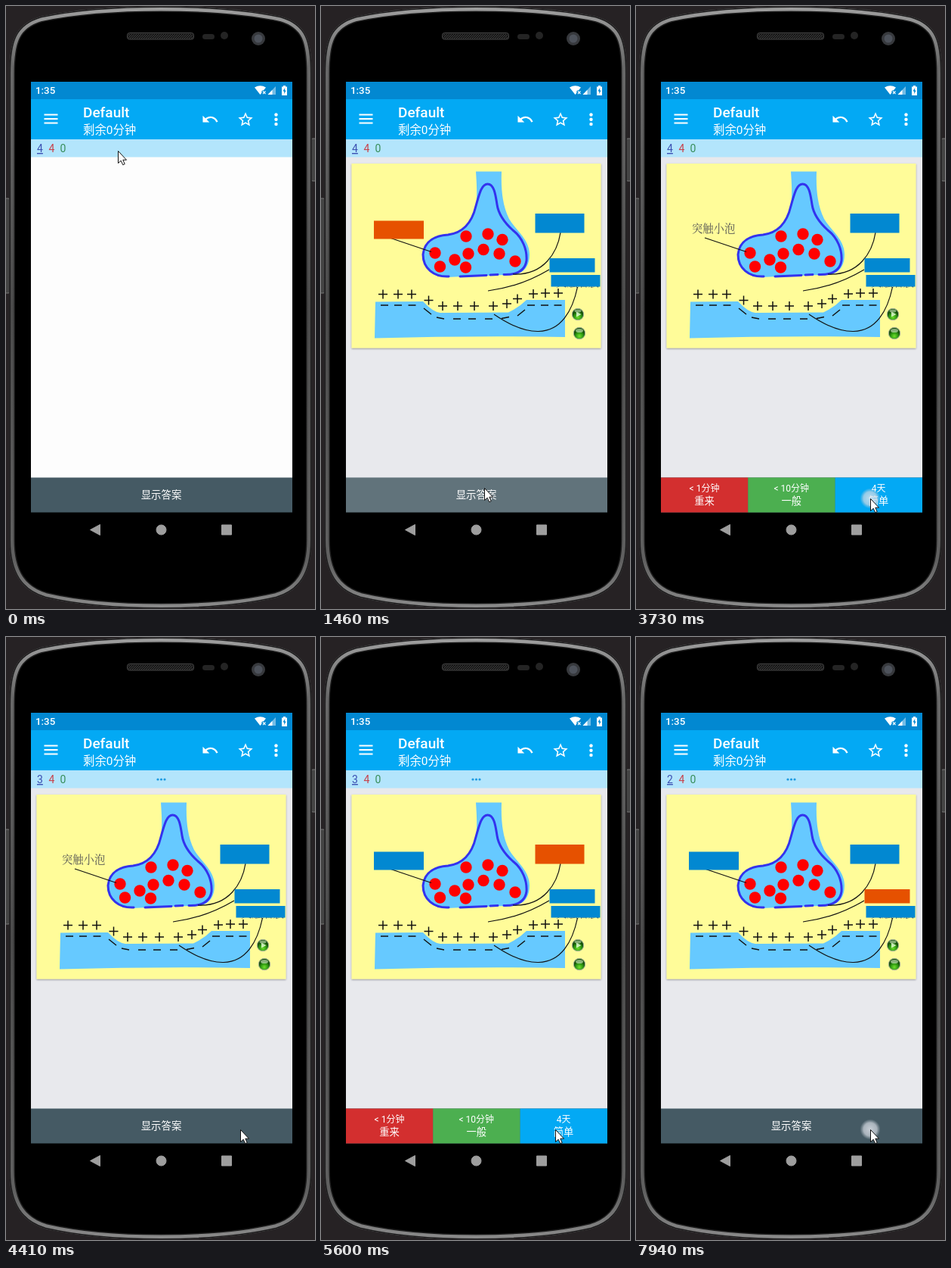
Recreate the animation shown at these times as an HTML page. Size 409x796 px, loop 8000 ms.

```html
<!DOCTYPE html>
<html lang="zh">
<head>
<meta charset="utf-8">
<style>
html, body { margin: 0; width: 100%; height: 100%; overflow: hidden; background: #262224; }
svg { display: block; width: 409px; height: 796px; }
text { font-family: Roboto, "Noto Sans CJK SC", "Noto Sans CJK", sans-serif; fill: #fff; }
.mid { text-anchor: middle; }
.label { font: 300 14.3px "Noto Serif CJK SC", "Noto Sans CJK SC", "Noto Sans CJK", serif; fill: #555; }
.thin { fill: none; stroke: #111; stroke-width: 1.2; }
.membrane { fill: none; stroke: #3333ee; stroke-width: 3; stroke-linecap: round; }
</style>
</head>
<body>
<svg viewBox="0 0 409 796">
  <defs>
    <path id="shell" d="M4.500 90C4.500 46 12 24 46 14C95 4 150 .5 205 .5C260 .5 315 4 364 14C398 24 404.500 46 404.500 90V705C404.500 750 388 772 358 781C315 791 260 795.500 205 795.500C150 795.500 95 791 52 781C22 772 4.500 750 4.500 705Z"/>
    <clipPath id="inside"><use href="#shell"/></clipPath>
    <clipPath id="easyClip"><rect x="263.500" y="622" width="115.500" height="47"/></clipPath>
    <linearGradient id="rim" x2="0" y2="1">
      <stop offset="0" stop-color="#a0a0a0"/>
      <stop offset=".1" stop-color="#686868"/>
      <stop offset=".5" stop-color="#4a4a4a"/>
      <stop offset=".92" stop-color="#606060"/>
      <stop offset="1" stop-color="#8c8c8c"/>
    </linearGradient>
    <pattern id="mesh" width="3" height="3" patternUnits="userSpaceOnUse">
      <path d="M0 3L3 0" stroke="#4a4a4a" stroke-width=".8"/>
    </pattern>
    <radialGradient id="touch">
      <stop offset="0" stop-color="#e8ebf2" stop-opacity=".8"/>
      <stop offset=".65" stop-color="#d5dae2" stop-opacity=".7"/>
      <stop offset="1" stop-color="#c0c8d0" stop-opacity="0"/>
    </radialGradient>
    <radialGradient id="bead" cx=".5" cy=".75">
      <stop offset="0" stop-color="#6fe02c"/>
      <stop offset=".6" stop-color="#2f9a12"/>
      <stop offset="1" stop-color="#155008"/>
    </radialGradient>
    <filter id="shade" x="-5%" y="-5%" width="110%" height="112%">
      <feDropShadow dx="0" dy="1" stdDeviation="1.2" flood-opacity=".4"/>
    </filter>
  </defs>

  <!-- phone -->
  <rect width="409" height="796" fill="#262224"/>
  <rect x="-3" y="254" width="8" height="125" rx="2" fill="#444" stroke="#777"/>
  <rect x="404" y="175" width="9" height="56" rx="2" fill="#444" stroke="#777"/>
  <g clip-path="url(#inside)" fill="none">
    <use href="#shell" fill="#000" stroke="#1d1d1d" stroke-width="15"/>
    <use href="#shell" stroke="url(#rim)" stroke-width="12"/>
    <use href="#shell" stroke="#1c1b1c" stroke-width="3"/>
  </g>
  <rect x="160.500" y="35.500" width="88" height="8.500" rx="3" fill="#161616" stroke="#484848"/>
  <rect x="162" y="37" width="85" height="6" fill="url(#mesh)"/>
  <rect x="260" y="37" width="16" height="7" rx="3.500" fill="#242424"/>
  <circle cx="289" cy="39" r="5" fill="#242424"/>
  <circle cx="334" cy="43" r="9" fill="#37393d"/>
  <circle cx="334" cy="43" r="5.500" fill="#4d525b"/>

  <!-- bars -->
  <rect id="page" x="33" y="199" width="346" height="424"/>
  <rect x="33" y="100" width="346" height="23" fill="#0288d1"/>
  <rect x="33" y="123" width="346" height="53" fill="#03a9f4"/>
  <rect x="33" y="176" width="346" height="23.500" fill="#b3e5fc"/>
  <text x="39" y="116.300" font-size="13.300" font-weight="500">1:35</text>
  <g fill="#fff">
    <path d="M329 107.500Q336.500 103 344 107.500L336.500 117Z"/>
    <path d="M339 112l4 4m0-4l-4 4" stroke="#0288d1" stroke-width="3"/>
    <path d="M340 112.500l3.500 3.500m0-3.500l-3.500 3.500" stroke="#fff" stroke-width="1.100"/>
    <path d="M357 106V117H346.500Z" opacity=".45"/>
    <path d="M352.500 110.700V117H346.500Z"/>
    <path d="M365 106.500h2v-1.500h3v1.500h2V118h-7Z"/>
    <path d="M369.200 108l-2.700 4.500h1.700v3.500l2.500-4.500h-1.500Z" fill="#0288d1"/>
    <path d="M50.500 142.500h18v2h-18zm0 5.500h18v2h-18zm0 5.500h18v2h-18z"/>
    <path transform="translate(258.500 137.800) scale(.98)" d="M12.500 8c-2.650 0-5.050.99-6.900 2.600L2 7v9h9l-3.620-3.620c1.390-1.160 3.160-1.880 5.120-1.880 3.540 0 6.550 2.310 7.600 5.500l2.370-.78C21.080 11.030 17.150 8 12.500 8z"/>
    <path transform="translate(305.400 138.200) scale(.97)" d="M22 9.240l-7.190-.62L12 2 9.190 8.630 2 9.240l5.460 4.730L5.820 21 12 17.270 18.180 21l-1.630-7.030zM12 15.400l-3.760 2.270 1-4.280-3.320-2.880 4.380-.38L12 6.100l1.710 4.040 4.380.38-3.320 2.880 1 4.280z"/>
    <circle cx="357.500" cy="143.500" r="2.200"/><circle cx="357.500" cy="149.700" r="2.200"/><circle cx="357.500" cy="155.900" r="2.200"/>
  </g>
  <text x="102" y="147" font-size="19" font-weight="500">Default</text>
  <text x="102" y="168.500" font-size="15.400">剩余0分钟</text>
  <g font-size="14">
    <text id="left" x="41" y="193" style="fill:#3b50b2;text-decoration:underline">4</text>
    <text x="56.500" y="193" style="fill:#c8414a">4</text>
    <text x="71.500" y="193" style="fill:#388e5a">0</text>
  </g>
  <g id="dots" fill="#1e9be2">
    <circle cx="201" cy="188" r="1.600"/><circle cx="205.500" cy="188" r="1.600"/><circle cx="210" cy="188" r="1.600"/>
  </g>

  <!-- flash card -->
  <g id="card">
    <rect x="40.500" y="208" width="330" height="243.500" fill="#fffc99" filter="url(#shade)"/>
    <path fill="#66c9ff" d="M205 218.500H239C238 245 241 265 249 281C258 296 276 308 276 328C276 342 270 352 256 355C225 355 195 357 167 358C148 357 135 345 135 329C137 309 153 303 168 302C192 299 201 281 205 264C207 248 206 234 205 218.500Z"/>
    <path fill="#66c9ff" d="M72 390.500L135 390Q148 404 158 405L248 404.500Q262 398 272 388H323V437Q200 435 71 438.500Z"/>
    <path class="membrane" d="M169 357C149 358 135 346 135 328C137 309 153 303 168 302C192 299 201 281 205 264C210 246 213 235 220.500 235C229 235 231 249 233 262C235 276 244 287 254 296C267 306 273 322 272 336C270 350 258 355 242 354.500M184 357L219 355.500M224 355L234 354.500"/>
    <g id="vesicles" fill="#f00"></g>
    <path class="thin" d="M91 306L146 324.500M317 299C313 325 295 356 254 354M302 348C275 364 245 373 221 376M339.500 371C333 402 318 429 288 429.500C268 430 248 420 229 407"/>
    <path id="charges" class="thin" style="stroke-width:1.5"/>
    <text class="label" x="74" y="298.500">突触小泡</text>
    <text class="label" x="288" y="292.500">突触前膜</text>
    <text class="label" x="304" y="347.500">突触间隙</text>
    <text class="label" x="311" y="370">突触后膜</text>
    <g id="masks">
      <rect x="70" y="283.500" width="66" height="24"/>
      <rect x="283.500" y="274" width="65" height="25.500"/>
      <rect x="302.500" y="333" width="60" height="18.500"/>
      <rect x="304.500" y="355" width="65" height="15.500"/>
    </g>
    <g stroke="#a9b39a" fill="url(#bead)">
      <circle cx="340" cy="407" r="7.700"/><circle cx="342" cy="432" r="7.700"/>
    </g>
    <g fill="#eaffdd">
      <path d="M338 403.500L344.500 407L338 410.500Z" opacity=".8"/>
      <ellipse cx="340" cy="402.500" rx="4.500" ry="2" opacity=".5"/>
      <ellipse cx="342" cy="428.500" rx="5" ry="2.600" opacity=".55"/>
    </g>
  </g>

  <!-- answer bar -->
  <rect x="33" y="622.500" width="346" height="46" fill="#455a64"/>
  <text class="mid" x="205.500" y="650.300" font-size="13.400" font-weight="500">显示答案</text>
  <rect id="flash" x="33" y="622.500" width="346" height="46" fill="#fff"/>
  <g id="grades"></g>
  <circle id="ripple" cx="310" cy="650" fill="#fff" opacity=".25" clip-path="url(#easyClip)"/>

  <g fill="#9e9e9e" stroke="#9e9e9e" stroke-linejoin="round">
    <path d="M111.500 691.500L124.500 684.500V698.500Z"/>
    <circle cx="205.500" cy="691.500" r="6.500"/>
    <rect x="285.500" y="685" width="13" height="13"/>
  </g>

  <g id="pointer">
    <circle id="tap" r="13.500" fill="url(#touch)"/>
    <path d="M.5 .5V16.500L4.200 13.200L6.700 18.700L9.200 17.600L6.800 12.200H11.500Z" fill="#fff" stroke="#111" stroke-linejoin="round"/>
  </g>
</svg>
<script>
const LOOP = 8000;
const $ = id => document.getElementById(id);

const vesicles = [[192,304],[221,301],[240,308.500],[151,326],[195,327],[215,321.500],[236,327],[177,335],[257,337],[157.500,344],[191.500,345]];
$('vesicles').innerHTML = vesicles.map(([x, y]) => `<circle cx="${x}" cy="${y}" r="7.700"/>`).join('');

const plus = [[82,380.500],[102,380.500],[120,380.500],[142.500,388.500],[161,396],[181,396],[203,396],[228,396],[246,393],[260,386.500],[281,380],[297,379],[314,379]];
const minus = [[84,395],[102,395],[120.500,395],[141,403,4],[158,412,1],[180,413],[200,413],[222,413],[244,411.500,-1],[265,405,-4],[278,395],[296,395],[313.500,395]];
$('charges').setAttribute('d',
  plus.map(([x, y]) => `M${x - 6} ${y}h12m-6-6v12`).join('') +
  minus.map(([x, y, rise = 0]) => `M${x - 5} ${y - rise}l10 ${rise * 2}`).join(''));

const grades = [['&lt; 1分钟', '重来', '#d32f2f'], ['&lt; 10分钟', '一般', '#4caf50'], ['4天', '简单', '#03a9f4']];
$('grades').innerHTML = grades.map(([due, name, color], i) => {
  const x = 33 + i * 115.3, mid = x + 57.5;
  return `<rect x="${x}" y="622.5" width="115.4" height="46" fill="${color}"/>
    <text class="mid" x="${mid}" y="640.7" font-size="12">${due}</text>
    <text class="mid" x="${mid}" y="658.3" font-size="13.3" font-weight="500">${name}</text>`;
}).join('');

// mask codes: blue, orange, gone, half-faded blue, orange fading in
const paint = { b: '#0288d1', o: '#e65100', '-': 'none', h: '#0288d180', m: '#746d69' };

// each step changes only the listed properties
const steps = [
  [0, { x: 148, y: 191, tap: 0, card: 0, flash: 0, grades: 0, ripple: 0, dots: 0, left: 4, masks: 'obbb' }],
  [120, { x: 160, y: 270 }],
  [240, { x: 194, y: 480 }],
  [360, { x: 216, y: 642 }],
  [510, { y: 636, card: 1 }],
  [1160, { tap: 1 }],
  [1310, { tap: .6, flash: .15 }],
  [1460, { tap: 0 }],
  [1760, { grades: .5 }],
  [1880, { grades: 1, flash: 0 }],
  [2030, { x: 245, y: 655 }],
  [2150, { x: 290, y: 658, masks: '-bbb' }],
  [2270, { x: 310, y: 650 }],
  [3730, { tap: 1 }],
  [4010, { tap: 0, ripple: 14, dots: 1 }],
  [4130, { ripple: 23 }],
  [4410, { ripple: 0, grades: 0, left: 3 }],
  [4660, { masks: 'hmbb' }],
  [4810, { masks: 'bobb' }],
  [5060, { tap: 1 }],
  [5330, { tap: 0, flash: .15 }],
  [5450, { grades: .5 }],
  [5600, { grades: 1, flash: 0 }],
  [5970, { dots: 0, masks: 'b-bb' }],
  [6560, { tap: .5 }],
  [6710, { tap: 1 }],
  [6860, { tap: .6 }],
  [7010, { tap: 0, ripple: 60, dots: 1 }],
  [7160, { ripple: 0, grades: 0, left: 2 }],
  [7410, { masks: 'bbob' }],
  [7940, { tap: 1 }]
];

const start = performance.now();

function draw(now) {
  const t = Math.max(0, now - start) % LOOP;
  const s = Object.assign({}, ...steps.filter(([at]) => at <= t).map(([, change]) => change));
  for (const id of ['tap', 'card', 'flash', 'grades', 'dots']) $(id).setAttribute('opacity', s[id]);
  $('page').setAttribute('fill', s.card ? '#e8e9ed' : '#fdfdfd');
  $('pointer').setAttribute('transform', `translate(${s.x} ${s.y})`);
  $('ripple').setAttribute('r', s.ripple);
  $('left').textContent = s.left;
  [...$('masks').children].forEach((box, i) => box.setAttribute('fill', paint[s.masks[i]]));
  requestAnimationFrame(draw);
}
draw(start);
</script>
</body>
</html>
```
